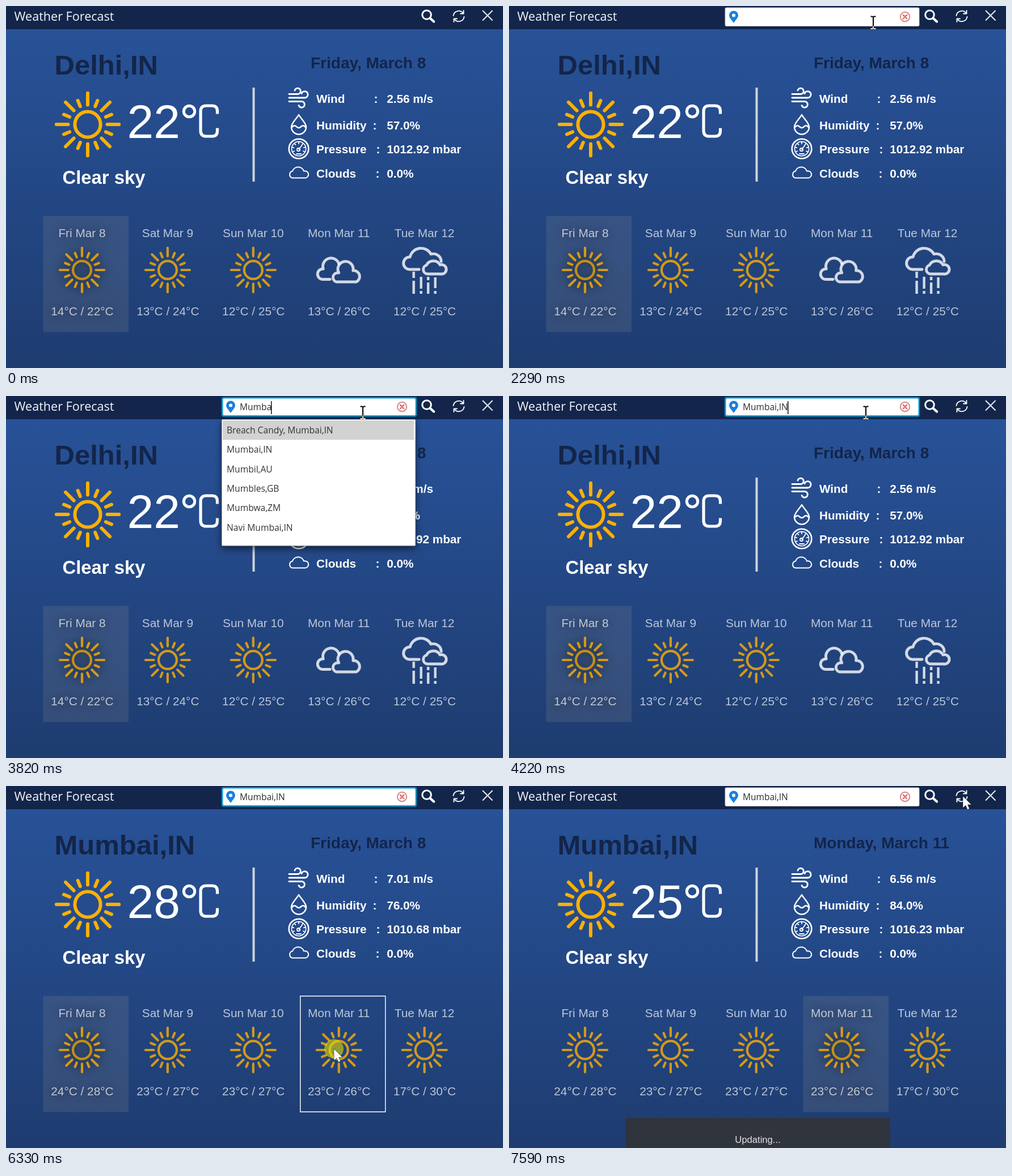
These frames come from a looping animation (876 px wide and 639 px high, 8 s). An HTML page with a canvas:

```html
<!DOCTYPE html>
<html lang="en">
<head>
<meta charset="utf-8">
<title>Weather Forecast</title>
<style>
html, body { margin: 0; width: 100%; height: 100%; overflow: hidden; background: #1e3c70; }
canvas { display: block; }
</style>
</head>
<body>
<canvas id="stage" width="876" height="639"></canvas>
<script>
const LOOP = 8000, W = 876, H = 639;
const ctx = document.getElementById('stage').getContext('2d');
const ARIAL = '"Liberation Sans", Arial, sans-serif';
const UI = '"Open Sans", "Noto Sans", sans-serif';
const NAVY = '#13254a', SUN = '#ffb000';

const DAYS = ['Fri Mar 8', 'Sat Mar 9', 'Sun Mar 10', 'Mon Mar 11', 'Tue Mar 12'];
const FIELD = { x: 380.5, y: 2.5, w: 343, h: 33.5 };
const CARD = { x: 65.5, y: 370.5, w: 151, h: 205 };

const delhi = {
  city: 'Delhi,IN', date: 'Friday, March 8', temp: '22', selected: 0,
  stats: ['2.56 m/s', '57.0%', '1012.92 mbar', '0.0%'],
  range: ['14/22', '13/24', '12/25', '13/26', '12/25'],
  icons: [sun, sun, sun, clouds, rain]
};
const mumbai = {
  city: 'Mumbai,IN', date: 'Friday, March 8', temp: '28', selected: 0,
  stats: ['7.01 m/s', '76.0%', '1010.68 mbar', '0.0%'],
  range: ['24/28', '23/27', '23/27', '23/26', '17/30'],
  icons: [sun, sun, sun, sun, sun]
};
const monday = {
  ...mumbai, date: 'Monday, March 11', temp: '25', selected: 3,
  stats: ['6.56 m/s', '84.0%', '1016.23 mbar', '0.0%']
};

const allCities = ['A Ver-O-Mar,PT', 'AElmhult,SE', 'AEngelholm Municipality,SE', 'Aalsmeer,NL',
  'Ab-e Kamari,AF', 'Abadou,MA', 'Abano Terme,IT', 'Abano Terme,IT', 'Abasolo,MX', 'Abasolo,MX'];
const mumbCities = ['Breach Candy, Mumbai,IN', 'Mumbai,IN', 'Mumbil,AU', 'Mumbles,GB', 'Mumbwa,ZM', 'Navi Mumbai,IN'];
const mumbaiCities = mumbCities.filter(c => c.includes('Mumbai'));

// Timelines: [start, value]
const weather = [[0, delhi], [5240, mumbai], [6480, monday]];
const typed = [[0, ''], [3200, 'M'], [3530, 'Mu'], [3680, 'Mum'], [3750, 'Mumb'],
  [3820, 'Mumba'], [3910, 'Mumbai'], [4220, 'Mumbai,IN']];
const popup = [[0, null], [3370, { rows: allCities, pick: 0 }], [3750, { rows: mumbCities, pick: 0 }],
  [3990, { rows: mumbaiCities, pick: 0 }], [4070, { rows: mumbaiCities, pick: 1 }], [4220, null]];
const toastTop = [[0, H], [7510, 613], [7590, 586]];

// Intervals: [start, end]
const caretOn = [[2450, 2840], [2970, 3370], [3530, 5550], [5860, 6330], [6800, 7300]];
const clicks = [[1750, 1970], [2450, 2610], [6330, 6480], [7420, 7590]];
const focused = [[2450, 7510]];

// Pointer path: [time, x, y]
const path = [[1440, 844, 96], [1750, 738, 17], [2060, 738, 17], [2290, 643, 28], [2450, 630, 28],
  [5700, 630, 28], [6330, 578, 464], [6570, 578, 464], [7260, 811, 24], [7420, 800, 18]];

const at = (line, t) => line.filter(k => k[0] <= t).pop()[1];
const within = (spans, t) => spans.some(([a, b]) => t >= a && t < b);

function pointer(t) {
  if (t < path[0][0]) return null;
  const i = path.findIndex(k => k[0] > t);
  if (i < 0) { const [, x, y] = path[path.length - 1]; return { x, y }; }
  const [a, x0, y0] = path[i - 1], [b, x1, y1] = path[i];
  const n = Math.round((b - a) / 78);
  const k = Math.floor((t - a) / (b - a) * n + 0.01) / n;
  const e = k * k * (3 - 2 * k);
  return { x: x0 + (x1 - x0) * e, y: y0 + (y1 - y0) * e };
}

function text(str, x, y, font, color, align = 'left') {
  ctx.font = font;
  ctx.fillStyle = color;
  ctx.textAlign = align;
  ctx.fillText(str, x, y);
}

function stroke(d, color, width, cap = 'round') {
  ctx.strokeStyle = color;
  ctx.lineWidth = width;
  ctx.lineCap = cap;
  ctx.lineJoin = 'round';
  ctx.stroke(new Path2D(d));
}

function ring(x, y, r, color, width) {
  ctx.beginPath();
  ctx.arc(x, y, r, 0, Math.PI * 2);
  ctx.strokeStyle = color;
  ctx.lineWidth = width;
  ctx.stroke();
}

function disc(x, y, r, color) {
  ctx.beginPath();
  ctx.arc(x, y, r, 0, Math.PI * 2);
  ctx.fillStyle = color;
  ctx.fill();
}

function box(x, y, w, h, r, fill) {
  ctx.beginPath();
  ctx.roundRect(x, y, w, h, r);
  ctx.fillStyle = fill;
  ctx.fill();
}

function sun(x, y, s = 0.707) {
  let rays = '';
  for (let i = 0; i < 16; i++) {
    const a = i * Math.PI / 8, c = Math.cos(a), n = Math.sin(a);
    const r0 = 34.5, r1 = i % 2 ? 45.5 : 55.2;
    rays += `M${c * r0} ${n * r0}L${c * r1} ${n * r1}`;
  }
  ctx.save();
  ctx.translate(x, y);
  ctx.scale(s, s);
  ring(0, 0, 22.6, SUN, 6);
  stroke(rays, SUN, 6);
  ctx.restore();
}

function clouds(x, y) {
  ctx.save();
  ctx.translate(x - 586.5, y - 466);
  stroke('M582 487A8.2 8.2 0 0 1 583.5 471H586.5A13.5 13.5 0 1 1 611.5 467A10.5 10.5 0 0 1 617 487Z', '#fff', 4.9);
  stroke('M571 482.5H557.5A9.2 9.2 0 0 1 559 464A14.2 14.2 0 0 1 586.5 455', '#fff', 4.9);
  ctx.restore();
}

function rain(x, y) {
  ctx.save();
  ctx.translate(x - 737.5, y - 466);
  stroke('M728 465H711A11 11 0 0 1 712 443A20 20 0 0 1 749 438A14 14 0 0 1 767 451', '#fff', 4.9);
  stroke('M742 473A8 8 0 0 1 741 457.5A13.5 13.5 0 0 1 765 457A8.3 8.3 0 1 1 766 473Z', '#fff', 4.9);
  stroke('M718.5 469V480M718.5 485V508M731.5 478V499M731.5 503V508M744 478V484M744 488V508M756.5 479V498M756.5 503V508',
    '#fff', 4.4, 'butt');
  ctx.restore();
}

function header() {
  ctx.fillStyle = NAVY;
  ctx.fillRect(0, 0, W, 41);
  text('Weather Forecast', 14.5, 26, '21.6px ' + UI, '#f4f6fa');
  ring(741.5, 15.5, 7.8, '#fff', 3);
  stroke('M748 22L754 27.5', '#fff', 4.4);
  stroke('M788.5 17A9.5 9.5 0 0 1 805.5 12.5M806.5 8V13.5H801M807.5 19A9.5 9.5 0 0 1 790.5 23.5M789.5 28V22.5H795',
    '#fff', 1.9);
  stroke('M840.5 8.5L857 25M857 8.5L840.5 25', '#e8ecf3', 2);
}

function statIcons() {
  stroke('M499 155.5H514.5A5.2 5.2 0 1 0 509 149M499 162H526.5A5.7 5.7 0 1 0 521 154.5M499 168.5H521A5.3 5.3 0 1 1 516 175.5',
    '#fff', 2.9);
  stroke('M516 192C512 199 503 206.5 503 213.5A13 13 0 0 0 529 213.5C529 206.5 520 199 516 192Z' +
    'M504 214Q508 209 512 213T520 213T528 214', '#fff', 2.5);
  ring(516, 252, 17.3, '#fff', 2.6);
  ring(516, 252, 12.6, '#fff', 1.6);
  let ticks = '';
  for (let i = 0; i < 7; i++) {
    const a = Math.PI * (0.85 + i * 1.3 / 6), c = Math.cos(a), n = Math.sin(a);
    ticks += `M${516 + c * 9} ${252 + n * 9}L${516 + c * 12} ${252 + n * 12}`;
  }
  stroke(ticks + 'M516 253L521.5 246M512 261H520', '#fff', 1.8);
  ring(515.5, 253.5, 2.6, '#fff', 1.8);
  stroke('M504.5 303.5A6.2 6.2 0 0 1 505 291.5A10.5 10.5 0 0 1 525 291.5A6.2 6.2 0 1 1 528 303.5Z', '#fff', 2);
}

function today(w) {
  text(w.city, 85.5, 121, 'bold 49px ' + ARIAL, NAVY);
  text(w.date, 537, 110, 'bold 28px ' + ARIAL, NAVY);
  sun(144, 209, 1);
  text(w.temp, 213.5, 232.5, '84px ' + ARIAL, '#fff');
  ring(323, 186, 9.7, '#fff', 5);
  stroke('M372.5 190.5V185.5Q372.5 176 363 176H353Q343 176 343 186V220Q343 230 353 230H363Q372.5 230 372.5 220.5V215.5',
    '#fff', 5.2, 'butt');
  text('Clear sky', 99.5, 313.5, 'bold 32.8px ' + ARIAL, '#fff');
  ctx.fillStyle = '#cdd4e0';
  ctx.fillRect(434.5, 144, 4, 166);

  statIcons();
  const font = 'bold 20.7px ' + ARIAL;
  [['Wind', 652, 171], ['Humidity', 650, 217.5], ['Pressure', 656, 260], ['Clouds', 655, 302.8]]
    .forEach(([label, colon, y], i) => {
      text(label, 547, y, font, '#fff');
      text(':', colon, y, font, '#fff', 'center');
      text(w.stats[i], 671.3, y, font, '#fff');
    });
}

function forecast(w, mouse) {
  const font = '20.8px ' + ARIAL;
  DAYS.forEach((day, i) => {
    const x = CARD.x + i * CARD.w, mid = 134 + i * 150.9;
    ctx.save();
    if (i === w.selected) {
      ctx.fillStyle = 'rgba(140,140,140,.2)';
      ctx.fillRect(x, CARD.y, CARD.w - 0.5, CARD.h);
      ctx.shadowColor = 'rgba(0,0,0,.8)';
      ctx.shadowBlur = 18;
    }
    ctx.globalAlpha = 0.7;
    text(day, mid, 408, font, '#fff', 'center');
    text(w.range[i].split('/').map(v => v + '°C').join(' / '), mid + 0.4, 545.5, font, '#fff', 'center');
    ctx.globalAlpha = 0.8;
    w.icons[i](mid, 466);
    ctx.restore();
    if (mouse && mouse.x > x && mouse.x < x + CARD.w && mouse.y > CARD.y && mouse.y < CARD.y + CARD.h) {
      ctx.strokeStyle = '#fff';
      ctx.lineWidth = 1.4;
      ctx.strokeRect(x + 0.2, CARD.y + 0.2, CARD.w - 1, CARD.h - 0.4);
    }
  });
}

function search(t) {
  const { x, y, w, h } = FIELD, focus = within(focused, t), str = at(typed, t);
  if (focus) {
    box(x - 1.2, y - 1.2, w + 2.4, h + 2.4, 4, 'rgba(3,158,211,.4)');
    box(x, y, w, h, 3, '#12a3d9');
    box(x + 2, y + 2, w - 4, h - 4, 2, '#fff');
  } else {
    box(x, y, w, h, 3, '#c5c8d4');
    box(x + 1, y + 1, w - 2, h - 2, 2, '#fff');
  }
  ctx.fillStyle = '#1a7fe0';
  ctx.fill(new Path2D('M396 30C393 25 388 21 388 16.5A8 8 0 0 1 404 16.5C404 21 399 25 396 30Z'));
  disc(396, 16.5, 3, '#fff');
  ring(698, 19, 8.2, '#dc8583', 2);
  stroke('M695 16L701 22M701 16L695 22', '#dc7573', 2.8);
  text(str, 412, 25.2, '15.5px ' + UI, '#2b2b2b');
  if (focus && within(caretOn, t)) {
    ctx.fillStyle = '#111';
    ctx.fillRect(Math.round(411.3 + ctx.measureText(str).width), 9, 1.5, 23);
  }
}

function dropdown({ rows, pick }) {
  const rowH = 34.3, top = 43, long = rows.length > 9;
  const bottom = Math.min(top + rowH * rows.length + 16, 396);
  ctx.save();
  ctx.shadowColor = 'rgba(0,0,0,.55)';
  ctx.shadowBlur = 13;
  ctx.shadowOffsetY = 5;
  box(380, 41, 342, bottom - 41, 2, '#b4b4b4');
  ctx.restore();
  box(381, 42, 340, bottom - 43, 1, '#fff');
  ctx.fillStyle = '#d2d2d2';
  ctx.fillRect(382, top + pick * rowH, long ? 319 : 337, rowH);
  rows.forEach((row, i) => text(row, 389, 66 + i * rowH, '15.6px ' + UI, '#333'));
  if (long) {
    ctx.fillStyle = '#f1f1f1';
    ctx.fillRect(701, 42, 19.5, bottom - 43);
    box(704.5, 58, 13, 22, 3, '#aaa');
    box(705.5, 59, 11, 20, 2, '#f3f3f3');
    stroke('M706.5 50.5L711 46.5L715.5 50.5M706.5 386L711 390L715.5 386', '#666', 1.3);
  }
}

function cursor(m, shown) {
  const inField = shown && m.x > FIELD.x && m.x < FIELD.x + FIELD.w && m.y < FIELD.y + FIELD.h;
  ctx.save();
  ctx.translate(m.x, m.y);
  if (inField) {
    ctx.globalCompositeOperation = 'difference';
    stroke('M-5.5 -9.5H-2.5L-1 -8.5L0.5 -9.5H3.5M-1 -8.5V11M-5.5 12H-2.5L-1 11L0.5 12H3.5', '#fff', 2, 'butt');
  } else {
    const arrow = new Path2D('M0 0V20.5L4.8 16.2L8 23.5L11.6 22L8.5 15H15Z');
    ctx.fillStyle = '#fff';
    ctx.fill(arrow);
    ctx.strokeStyle = 'rgba(0,0,0,.55)';
    ctx.lineWidth = 0.8;
    ctx.stroke(arrow);
  }
  ctx.restore();
}

function draw(t) {
  const w = at(weather, t), mouse = pointer(t), list = at(popup, t), shown = t >= 1910, top = at(toastTop, t);
  const sky = ctx.createLinearGradient(0, 41, 0, H);
  sky.addColorStop(0, '#285298');
  sky.addColorStop(1, '#1e3c70');
  ctx.fillStyle = sky;
  ctx.fillRect(0, 0, W, H);
  header();
  today(w);
  forecast(w, mouse);
  if (shown) search(t);
  if (list) dropdown(list);
  if (top < H) {
    ctx.fillStyle = '#30343c';
    ctx.fillRect(205, top, 466.5, H - top);
    text('Updating...', 438.5, top + 44, '16.6px ' + ARIAL, '#e2e3e5', 'center');
  }
  if (mouse) {
    if (within(clicks, t)) disc(mouse.x, mouse.y, 17, 'rgba(225,220,0,.6)');
    cursor(mouse, shown);
  }
}

const start = performance.now();
function tick() {
  draw((performance.now() - start) % LOOP);
  requestAnimationFrame(tick);
}
tick();
</script>
</body>
</html>
```
